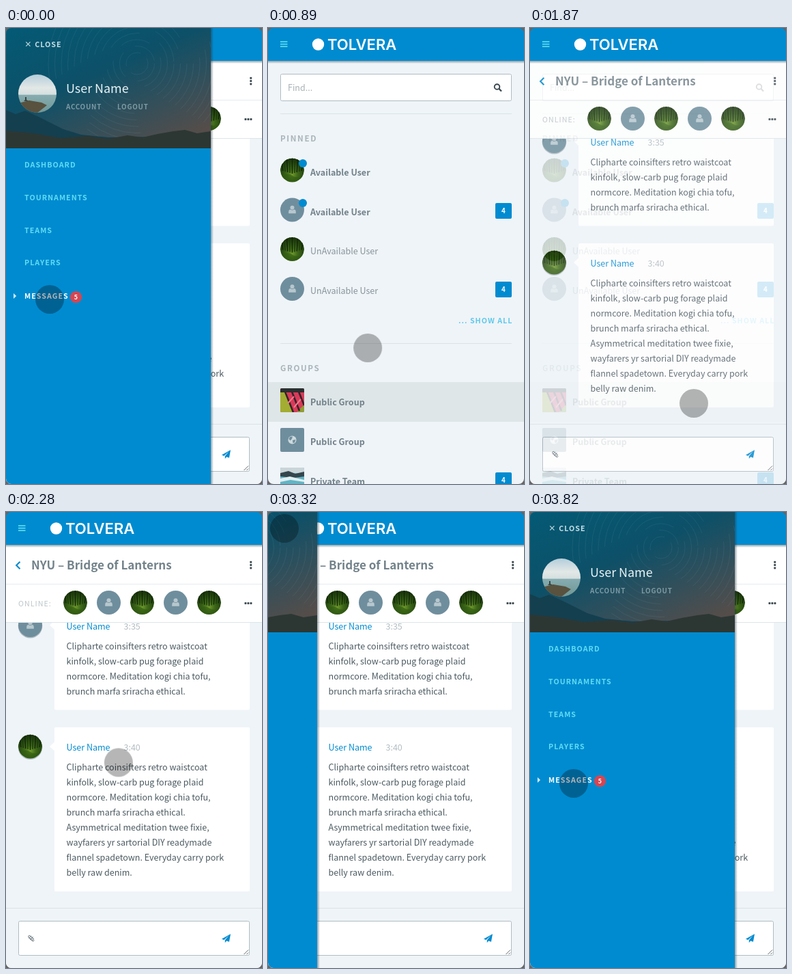
Recreate the animation shown at these times as an HTML page. Size 375 by 667 pixels, loop 3.85 s.

```html
<!DOCTYPE html>
<html lang="en">
<head>
<meta charset="utf-8">
<title>Team messages</title>
<style>
html, body { margin: 0; width: 100%; height: 100%; overflow: hidden; background: #646464; }
svg { display: block; width: 375px; height: 667px; clip-path: inset(0 round 8px); }
text { font-family: "Noto Sans CJK JP", "Noto Sans CJK SC", "Noto Sans", sans-serif; white-space: pre; }
.brand { font: 600 22px Inter, sans-serif; }
</style>
</head>
<body>
<svg id="stage" viewBox="0 0 375 667" xmlns="http://www.w3.org/2000/svg"></svg>
<script>
const BLUE = '#008bd0', PAGE = '#eff4f8', LINE = '#dae3e7', SLATE = '#6f8e9d', PALE = '#b7c7ce';
const BOLD = '#72828a', BODY = '#4b5a60', CYAN = '#5fdcf4', MUTED = '#a9b5ba';
const LOOP = 3850;

// The Latin glyphs of the CJK family are drawn about 1.117 times larger than nominal.
const text = (x, y, str, fill, { size = 14, bold = 0, gap = 0, anchor = 'start' } = {}) =>
  `<text x="${x}" y="${y}" fill="${fill}" text-anchor="${anchor}" font-weight="${bold ? 600 : 400}"
    style="font-size:${(size / 1.117).toFixed(2)}px;letter-spacing:${gap}px">${str}</text>`;
const caps = (x, y, str, fill, size = 12, gap = 1, bold = 1) => text(x, y, str, fill, { size, gap, bold });
const rect = (x, y, w, h, fill, more = '') => `<rect x="${x}" y="${y}" width="${w}" height="${h}" fill="${fill}" ${more}/>`;
const disc = (x, y, r, fill, more = '') => `<circle cx="${x}" cy="${y}" r="${r}" fill="${fill}" ${more}/>`;
const shape = (d, fill, more = '') => `<path d="${d}" fill="${fill}" ${more}/>`;
const stroke = (d, color, width = 1) => `<path d="${d}" fill="none" stroke="${color}" stroke-width="${width}"/>`;
const use = (id, x, y) => `<use href="#${id}" x="${x}" y="${y}"/>`;
const rule = y => stroke(`M18 ${y}H357`, LINE);
const field = (y, h) => rect(18.5, y + .5, 338, h - 1, '#fff', 'rx="2" stroke="#b0bcc2"');
const range = (n, fn) => Array.from({ length: n }, (_, i) => fn(i)).join('');
const stops = list => list.map(([o, c, a = 1]) => `<stop offset="${o}" stop-color="${c}" stop-opacity="${a}"/>`).join('');

const defs = `<defs>
  <clipPath id="round"><circle r="17.5"/></clipPath>
  <clipPath id="port"><circle cx="46" cy="96" r="28"/></clipPath>
  <clipPath id="tile"><rect width="35" height="35" rx="2"/></clipPath>
  <clipPath id="cover"><rect width="300" height="176"/></clipPath>
  <radialGradient id="leaf" cx=".5" cy=".68" r=".72">${stops([[0, '#6f9a2c'], [.3, '#416b1a'], [.65, '#274a10'], [1, '#142a08']])}</radialGradient>
  <linearGradient id="night" x2=".75" y2="1">${stops([[0, '#045a75'], [.45, '#0d5068'], [.75, '#344f5a'], [1, '#544d4a']])}</linearGradient>
  <linearGradient id="sky" x2="0" y2="1">${stops([[0, '#b4cdda'], [.35, '#e2e8e6'], [.52, '#d5dfdf'], [.54, '#86acb0'], [1, '#6f9795']])}</linearGradient>
  <linearGradient id="drop" x2="0" y2="1">${stops([[0, '#30434d', .5], [1, '#30434d', 0]])}</linearGradient>
  <linearGradient id="side">${stops([[0, '#20323c', .45], [1, '#20323c', 0]])}</linearGradient>
  <g id="forest"><g clip-path="url(#round)">
    ${disc(0, 0, 17.5, 'url(#leaf)')}
    ${range(9, i => stroke(`M${i * 4 - 16} -18L${i * 3.4 - 13.6} ${5 - Math.abs(i - 4)}`, i % 2 ? '#1b3a0a' : '#12260a', 1.4))}
    ${shape('M-18 9Q-6 3 0 8T18 7V18H-18Z', '#2f5a12', 'opacity=".6"')}
  </g></g>
  <g id="person">
    ${disc(0, 0, 17.5, SLATE)}${disc(0, -3.2, 3, PALE)}
    ${shape('M-5.3 5.3V3Q-5.3 -.4 -2.6 -.4Q0 1.4 2.6 -.4Q5.3 -.4 5.3 3V5.3Z', PALE)}
  </g>
  <g id="mural"><g clip-path="url(#tile)">
    ${rect(0, 0, 35, 35, '#d93a59')}
    ${shape('M0 6L9 6L19 35H0Z', '#a3ad31')}${shape('M24 35L35 24V35Z', '#8e9f35')}
    ${stroke('M7 5L19 35M17 5L28 33M27 5L35 25', '#35222a', 2.6)}
    ${stroke('M11 22L20 12M20 28L30 16', '#f07a8c', 2)}
    ${rect(0, 0, 35, 6, '#2b3030')}
  </g></g>
  <g id="globe">
    ${rect(0, 0, 35, 35, SLATE, 'rx="2"')}${disc(17.5, 17.5, 6, '#cdd9de')}
    ${shape('M14 13L18 12.5L17 16L14.5 18.5L12.5 16ZM18 18L22.5 17L21 21.5L18.5 22Z', SLATE)}
  </g>
  <g id="water"><g clip-path="url(#tile)">
    ${rect(0, 0, 35, 35, '#62b4c4')}${rect(0, 0, 35, 8, '#c9d5d9')}
    ${shape('M0 8L12 5L22 9L35 6V13L20 15L0 13Z', '#34464d')}
    ${shape('M0 16L14 13L35 18V21L15 18L0 21Z', '#dfeff2')}
  </g></g>
</defs>`;

const badge = y => rect(333, y, 24, 23, BLUE, 'rx="2"') +
  text(345, y + 15, '4', '#fff', { size: 11, bold: 1, anchor: 'middle' });

const userRow = (icon, y, online) => use(icon, 35.5, y) +
  (online ? disc(51, y - 10, 6, BLUE) : '') +
  text(62, y + 7.5, online ? 'Available User' : 'UnAvailable User', online ? BOLD : '#87949a', { bold: online });

const groupRow = (icon, y, name) => use(icon, 18, y) + text(62, y + 24.5, name, BOLD, { bold: 1 });

const list = rect(0, 48, 375, 619, PAGE) + field(67, 40) +
  text(29, 92, 'Find...', '#a8b1b5') +
  disc(335.5, 86, 3.8, 'none', 'stroke="#37444a" stroke-width="1.9"') + stroke('M338.3 88.8L342 92.5', '#37444a', 2.3) +
  rule(125.5) + caps(18, 166, 'PINNED', MUTED, 13, 1.6) +
  userRow('forest', 208, 1) + userRow('person', 266, 1) + userRow('forest', 323.5, 0) + userRow('person', 381.5, 0) +
  badge(256) + badge(371) +
  caps(279, 432, '... SHOW ALL', '#61c8ea') + rule(461.5) +
  caps(18, 502, 'GROUPS', MUTED, 13, 1.6) + rect(0, 518, 375, 58, '#dfe6e8') +
  groupRow('mural', 527, 'Public Group') + groupRow('globe', 585, 'Public Group') + groupRow('water', 643, 'Private Team') +
  badge(650);

const verse = ['Clipharte coinsifters retro waistcoat', 'kinfolk, slow-carb pug forage plaid',
  'normcore. Meditation kogi chia tofu,', 'brunch marfa sriracha ethical.',
  'Asymmetrical meditation twee fixie,', 'wayfarers yr sartorial DIY readymade',
  'flannel spadetown. Everyday carry pork', 'belly raw denim.'];

const message = (icon, y, time, lines) =>
  disc(35.5, y + 1.2, 17.8, '#51656f', 'opacity=".4"') + use(icon, 35.5, y) +
  rect(71, y - 28, 286, lines * 22 + 64, '#fff', 'rx="2"') + shape(`M71.5 ${y - 7}L64 ${y}L71.5 ${y + 7}Z`, '#fff') +
  text(88.5, y + 6, 'User Name', BLUE) + text(172.5, y + 6, time, '#b3bcc1') +
  verse.slice(0, lines).map((s, i) => text(88.5, y + 35 + i * 22, s, BODY)).join('');

const chat = rect(0, 48, 375, 619, PAGE) +
  message('person', 165.5, '3:35', 4) + message('forest', 343, '3:40', 8) +
  rect(0, 48, 375, 113, '#fff') + rect(0, 105, 375, 1, '#e6ecef') + rect(0, 161, 375, 1, '#dde5e9') +
  stroke('M20.5 72.7L15.2 78L20.5 83.3', BLUE, 2.1) +
  text(37, 84, 'NYU – Bridge of Lanterns', BOLD, { size: 19, bold: 1 }) +
  range(3, i => rect(357.2, 71.8 + i * 4.3, 3, 3, '#3f4c52', 'rx=".8"') + rect(349.4 + i * 4, 132, 3, 3, '#3f4c52', 'rx=".8"')) +
  caps(18, 138, 'ONLINE:', '#bcc5c9', 12, 1, 0) +
  range(5, i => use(i % 2 ? 'person' : 'forest', 101.5 + i * 49, 132.5)) +
  rect(0, 579, 375, 1, LINE) + field(598, 51) +
  stroke('M39.5 621.5L35.5 625.5M37.2 619.8L33.6 623.2M40.6 624.5L37.4 621.2M41.5 626.5Q40 629 37.5 626.8L33 622.2Q32 619.5 34.8 619.3L40 624.5Q40.5 626.5 38.4 626.2L35 622.8', '#59676d', .9) +
  shape('M316 624.6L329 617.2L326.9 628.8L323.2 627.3L320.8 630V626.2L326.5 619.6L319.3 625.9Z', BLUE) +
  stroke('M348.5 647L355 640.5M352.5 647L355 644.5', '#5d666a', 1);

const header = rect(0, 48, 375, 4, 'url(#drop)') + rect(0, 0, 375, 48, BLUE) +
  range(3, i => rect(18, 19.3 + i * 3.5, 10.5, 1.6, '#62e0ee')) +
  disc(73.5, 24, 8.7, '#fff') + `<text class="brand" x="87" y="32" fill="#fff">TOLVERA</text>`;

const cover = `<g clip-path="url(#cover)">${rect(0, 0, 300, 176, 'url(#night)')}
  ${range(13, i => disc(192, 52, 16 + i * 9.5, 'none',
    `stroke="#b9dbe0" stroke-opacity=".12" stroke-width=".7" stroke-dasharray="${34 + i * 5} ${12 + i * 7}"`))}
  ${shape('M0 120L14 126L28 121L48 130L66 139L84 148L110 156L150 160L300 158V176H0Z', '#143f4f')}
  ${shape('M0 150L40 154L80 161L120 158L150 162L178 157L200 160L222 155L245 151L262 149L280 154L300 151V176H0Z', '#2c3734')}
</g>`;

const portrait = `<g clip-path="url(#port)">${rect(18, 68, 56, 56, 'url(#sky)')}
  ${shape('M18 110L34 106L52 109L60 113L46 124H18Z', '#58523f')}${shape('M28 105V101H30V105L33 107H26Z', '#394540')}</g>`;

const menu = ['DASHBOARD', 'TOURNAMENTS', 'TEAMS', 'PLAYERS'];
const drawer = rect(300, 0, 4, 667, 'url(#side)') + rect(0, 0, 300, 667, BLUE) + cover +
  caps(27, 28, '× CLOSE', '#c4dee5') + portrait +
  text(88, 95, 'User Name', '#eaf4f6', { size: 20 }) +
  caps(88, 119, 'ACCOUNT', '#7d9ba5', 11, .75) + caps(163, 119, 'LOGOUT', '#7d9ba5', 11, .75) +
  menu.map((s, i) => caps(27, 204 + i * 47.8, s, CYAN)).join('') +
  shape('M11 388L15.2 392L11 396Z', '#c9ecf8') + caps(27, 396, 'MESSAGES', '#fff') +
  disc(102.5, 393.5, 8.6, '#d64552') + text(102.5, 396.8, '5', '#fff', { size: 10, bold: 1, anchor: 'middle' });

const layer = (id, body) => `<g id="${id}">${body}</g>`;
const stage = document.getElementById('stage');
stage.innerHTML = defs + list + layer('chat', chat) + header + layer('drawer', drawer) +
  layer('cursor', `<circle id="dot" r="21"/>`);

// Each row: time, value, number of steps taken on the way to the next row.
function play(id, prop, rows, value = v => v) {
  const frames = rows.map(([t, v, n = 1]) => ({ offset: t / LOOP, [prop]: value(v), easing: `steps(${n}, end)` }));
  document.getElementById(id).animate(frames, { duration: LOOP, iterations: Infinity, delay: -1, fill: 'both' });
}

const REST = .29, PRESS = .55;
const press = t => [[t, REST, 3], [t + 90, PRESS, 3], [t + 180, REST]];
const item = [64, 397], group = [240, 549], burger = [24, 24];

play('cursor', 'transform',
  [[0, item], [680, item, 15], [1130, group], [2040, group, 23], [2730, burger], [3550, burger, 9], [3820, item], [LOOP, item]],
  ([x, y]) => `translate(${x}px, ${y}px)`);
play('dot', 'opacity', [...press(0), ...press(1300), ...press(2870), [LOOP, REST]]);
play('drawer', 'transform',
  [[0, 0], [420, 0, 4], [540, -304], [3290, -304, 4], [3410, 0], [LOOP, 0]],
  x => `translate(${x}px, 0px)`);
play('chat', 'opacity', [[0, 1], [250, 0], [1720, 0, 6], [1900, 1], [LOOP, 1]]);
</script>
</body>
</html>
```
